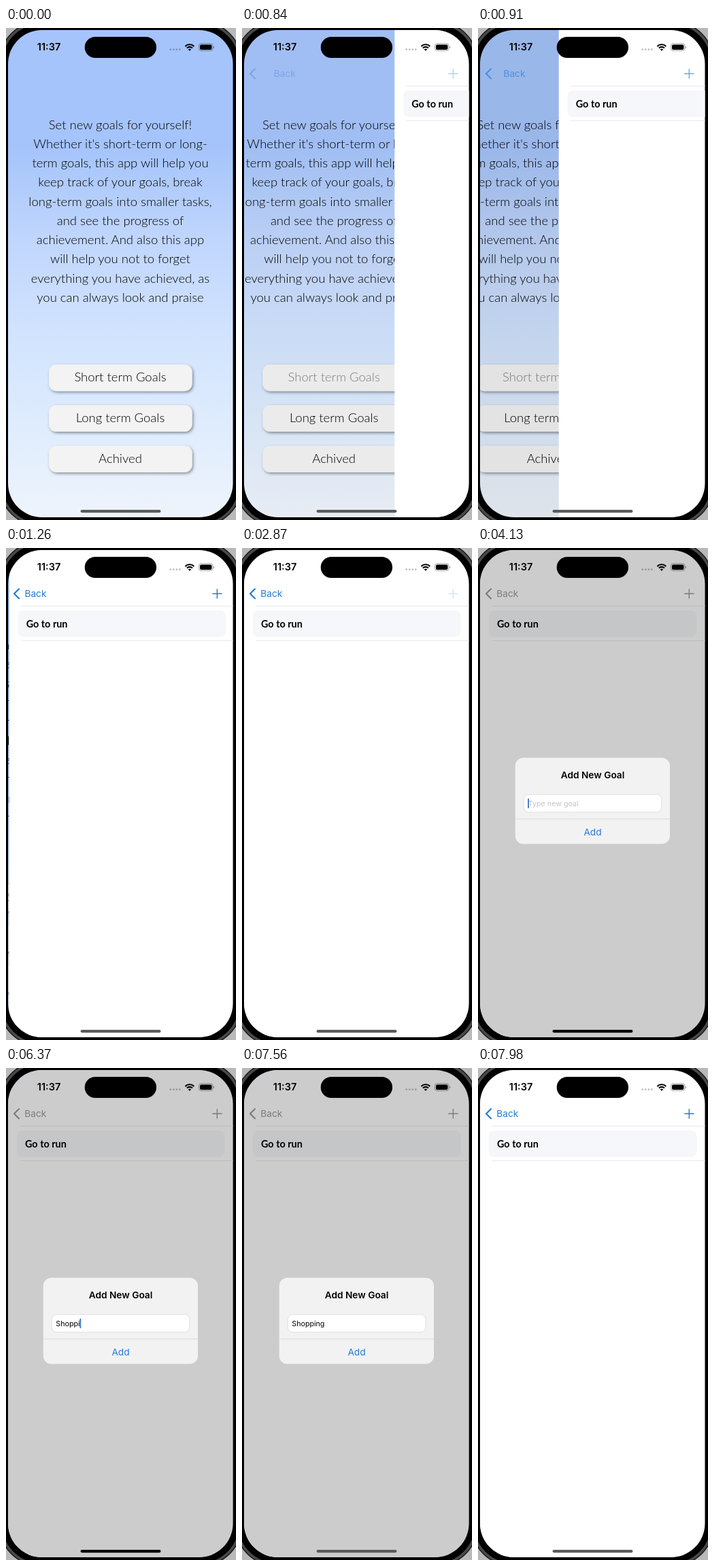
An HTML page for the animation above (8000 ms loop, 338 by 724 pixels).

```html
<!DOCTYPE html>
<html lang="en">
<head>
<meta charset="utf-8">
<title>Goals</title>
<style>
html, body { margin: 0; width: 100%; height: 100%; overflow: hidden; background: #000; }
svg { display: block; width: 338px; height: 724px; }
text { font-family: Inter, "Open Sans", sans-serif; white-space: pre; }
.hand { font-family: Lato, "Open Sans", sans-serif; font-size: 18.5px; font-weight: 300; text-anchor: middle; }
.line { fill: none; stroke-linecap: round; stroke-linejoin: round; }
</style>
</head>
<body>
<svg viewBox="0 0 338 724">
  <defs>
    <linearGradient id="sky" x1="0" y1="0" x2="0" y2="1">
      <stop offset="0" stop-color="#a5c4fb"/>
      <stop offset=".24" stop-color="#a5c4fb"/>
      <stop offset=".42" stop-color="#bfd5fc"/>
      <stop offset=".62" stop-color="#d1e3fe"/>
      <stop offset=".83" stop-color="#e0edfd"/>
      <stop offset="1" stop-color="#eff4fb"/>
    </linearGradient>
    <filter id="shadow" x="-10%" y="-20%" width="120%" height="160%">
      <feDropShadow dx="1.7" dy="2" stdDeviation="2.2" flood-color="#000" flood-opacity=".42"/>
    </filter>
    <clipPath id="screen"><rect x="3" y="3" width="330.5" height="717" rx="50"/></clipPath>
  </defs>

  <!-- phone body -->
  <rect width="338" height="724" fill="#b9b9b9"/>
  <rect x="-11" y="-11" width="358.5" height="745" rx="63" fill="#1c1c1c"/>
  <rect x="-9.5" y="-9.5" width="355.5" height="742" rx="61.5" fill="#4a4a4a"/>
  <rect x="-6" y="-6" width="348.5" height="735" rx="58" fill="#000"/>

  <g clip-path="url(#screen)">
    <g id="home">
      <rect x="3" y="3" width="331" height="718" fill="url(#sky)"/>
      <g id="intro"></g>
      <g id="buttons"></g>
    </g>
    <rect id="homeDim" x="3" y="3" width="331" height="718"/>

    <g id="list">
      <rect x="3" y="3" width="331" height="718" fill="#fff"/>
      <path d="M20 85.5H334M20 136.5H334" stroke="#e9e9eb"/>
      <rect x="15.7" y="92" width="305.8" height="39" rx="8" fill="#f6f7fa"/>
      <text x="28" y="117.3" style="font:700 14.4px Lato,sans-serif">Go to run</text>
    </g>

    <g id="nav">
      <path class="line tint" d="M19 60.3L12 67.3L19 74.3" stroke-width="2.2"/>
      <text id="back" x="27.3" y="72" font-size="13.7">Back</text>
      <path id="plus" class="line tint" d="M303.7 67.3H317M310.3 60.6V74" stroke-width="1.4"/>
    </g>

    <!-- status bar -->
    <text x="45.8" y="33.3" font-size="14.5" font-weight="600">11:37</text>
    <g fill-opacity=".22">
      <circle cx="241.6" cy="31.4" r="1.5"/><circle cx="246.2" cy="31.4" r="1.5"/>
      <circle cx="250.8" cy="31.4" r="1.5"/><circle cx="255.3" cy="31.4" r="1.5"/>
    </g>
    <g fill="none" stroke="#000" stroke-width="2.1">
      <path d="M263.4 26.9A9.2 9.2 0 0 1 276.4 26.9M265.8 29.6A5.8 5.8 0 0 1 274 29.6"/>
      <path d="M269.9 33.8L267.7 31.5A3.2 3.2 0 0 1 272.1 31.5Z" fill="#000" stroke="none"/>
    </g>
    <rect x="283.5" y="23" width="20.4" height="10.4" rx="3.2" fill="none" stroke="#000" stroke-opacity=".38"/>
    <rect x="285" y="24.5" width="17.4" height="7.4" rx="2" fill="#000"/>
    <path d="M305 26.6A1.8 1.8 0 0 1 305 29.9Z" fill="#000" fill-opacity=".45"/>

    <rect id="dim" x="3" y="3" width="331" height="718"/>
    <g id="alert">
      <rect x="54.7" y="308.8" width="227.3" height="126.7" rx="12" fill="#f2f2f2"/>
      <text x="168.5" y="339" font-size="13.7" font-weight="600" text-anchor="middle">Add New Goal</text>
      <rect x="67.3" y="362.8" width="202.4" height="26" rx="7" fill="#fff" stroke="#dadada" stroke-width=".8"/>
      <text id="hint" x="73.8" y="380.2" font-size="10.7" fill="#c3c3c5">Type new goal</text>
      <text id="typed" x="73.3" y="380.2" font-size="10.7"></text>
      <rect id="caret" y="368.6" width="1.7" height="14.4" rx=".8" fill="#2d68c4"/>
      <path d="M55 398.8H282" stroke="#d6d6d6" stroke-width=".9"/>
      <text x="168.5" y="422.8" font-size="13.7" text-anchor="middle" fill="#2478d6">Add</text>
    </g>
    <rect id="bar" x="109.5" y="709" width="118" height="4.2" rx="2.1"/>
  </g>
  <rect x="115.7" y="13" width="105.3" height="31" rx="15.5"/>
</svg>

<script>
const LOOP = 8000, STEP = 70;
const $ = id => document.getElementById(id);
const set = (el, attrs) => { for (const k in attrs) el.setAttribute(k, attrs[k]); };

function add(parent, tag, attrs, label = '') {
  const el = document.createElementNS('http://www.w3.org/2000/svg', tag);
  set(el, attrs);
  el.textContent = label;
  return parent.appendChild(el);
}

['Set new goals for yourself!', "Whether it's short-term or long-", 'term goals, this app will help you',
 'keep track of your goals, break', 'long-term goals into smaller tasks,', 'and see the progress of',
 'achievement. And also this app', 'will help you not to forget', 'everything you have achieved, as',
 'you can always look and praise'
].forEach((label, i) => add($('intro'), 'text', { class: 'hand', x: 168, y: 148.7 + 28.25 * i }, label));

const labels = ['Short term Goals', 'Long term Goals', 'Achived'].map((label, i) => {
  const y = 495.2 + 59.8 * i;
  add($('buttons'), 'rect', { x: 63.1, y, width: 210.4, height: 39, rx: 11, fill: '#f3f3f3', filter: 'url(#shadow)' });
  return add($('buttons'), 'text', { class: 'hand', x: 168, y: y + 25 }, label);
});

// critically damped spring, 0 to 1
function spring(ms, rate) {
  const x = Math.max(0, ms) / 1000 * rate;
  return 1 - (1 + x) * Math.exp(-x);
}

const WORD = 'Shopping';
const keyTimes = [4830, 5250, 5810, 6020, 6160, 6370, 6580, 6720];
const caretSteps = [[0, 0], [4060, .5], [4130, 1], [4690, .5], [4760, 0], [4830, 1], [7280, .5], [7350, 0]];
const BLUE = [38, 122, 208], GRAY = [155, 155, 155];

function render(t) {
  // push to the list page
  const push = t < 770 ? 0 : t >= 1330 ? 1 : spring(t - 760, 14.8);
  const rest = 1 - push;
  set($('home'), { transform: `translate(${-99 * push} 0)` });
  set($('homeDim'), { opacity: .1 * push });
  set($('list'), { transform: `translate(${331 * rest} 0)` });
  set(labels[0], { opacity: t < 770 ? 1 : .48 });
  set($('nav'), { opacity: push });
  set($('back'), { transform: `translate(${29 * rest} 0)` });

  // alert in and out
  const shown = t < 3080 ? 0 : t >= 3780 ? 1 : spring(t - 3060, 13);
  const gone = t >= 7980 ? 1 : spring(t - 7600, 18);
  const open = shown * (1 - gone);
  const scale = 1 + .15 * (1 - shown);
  set($('dim'), { opacity: .2 * open });
  set($('alert'), {
    opacity: open,
    transform: `translate(168.5 372) scale(${scale}) translate(-168.5 -372)`
  });

  const tint = `rgb(${BLUE.map((c, i) => Math.round(c + (GRAY[i] - c) * open))})`;
  document.querySelectorAll('.tint').forEach(el => set(el, { stroke: tint }));
  set($('back'), { fill: tint });
  const pressed = t >= 2870 && t < 3780;
  set($('plus'), { opacity: pressed ? .2 + .8 * shown : 1 });
  set($('bar'), { fill: t >= 3430 && t < 7490 ? '#000' : '#5b5b5b' });

  // typing
  const count = keyTimes.filter(k => k <= t).length;
  $('typed').textContent = WORD.slice(0, count);
  set($('hint'), { opacity: count ? 0 : 1 });
  const width = count ? $('typed').getComputedTextLength() : 0;
  set($('caret'), { x: 73.2 + width, opacity: caretSteps.filter(s => s[0] <= t).pop()[1] });
}

const start = performance.now();
function tick() {
  const t = (performance.now() - start) % LOOP;
  render(Math.floor(t / STEP) * STEP);
  requestAnimationFrame(tick);
}
tick();
</script>
</body>
</html>
```
